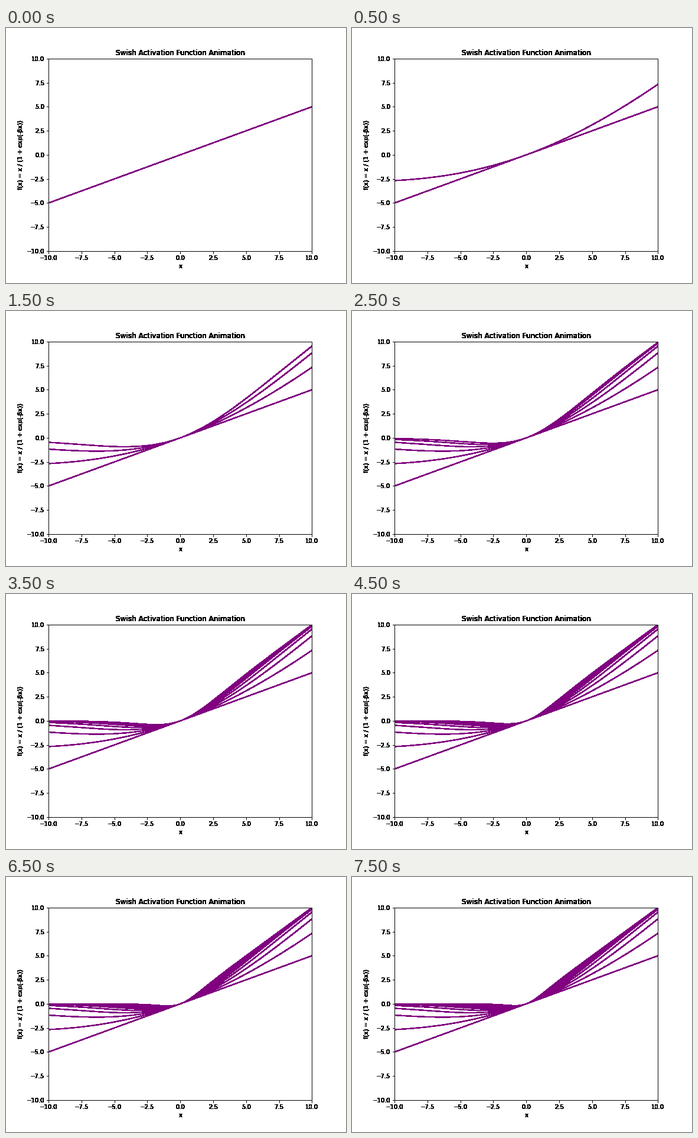
Recreate the animation shown at these times as a matplotlib script. Size 576 by 432 pixels, loop 8 s.

```python
import matplotlib.pyplot as plt
import numpy as np
from matplotlib.animation import FuncAnimation
from matplotlib.colors import to_rgb

STEPS, INTERVAL = 16, 500
betas = np.linspace(0, 10, 100)[:STEPS]
x = np.linspace(-10, 10, 400)

plt.rcParams.update({"font.family": "DejaVu Sans", "font.size": 10})


def harden(artist, color="black"):
    """Paint every pixel the artist touches in one opaque colour."""
    rgb = np.round(np.array(to_rgb(color)) * 255)

    def solid(img, dpi):
        out = np.empty(img.shape, np.uint8)
        out[..., :3] = rgb
        out[..., 3] = np.where(img[..., 3] > 0, 255, 0)
        return out, 0, 0

    artist.set_agg_filter(solid)


def swish(x, beta):
    return x / (1 + np.exp(-beta * x))


fig = plt.figure(figsize=(8, 6), dpi=72, facecolor="white")
fig.subplots_adjust(left=0.125, right=0.9, bottom=0.125, top=0.88)
ax = fig.add_subplot()
ax.set(xlim=(-10, 10), ylim=(-10, 10), xlabel="x",
       ylabel="f(x) = x / (1 + exp(-βx))",
       title="Swish Activation Function Animation")

for part in (ax.xaxis, ax.yaxis, ax.title, *ax.spines.values()):
    harden(part)

lines = [ax.plot(x, swish(x, b), color="purple", lw=1.5)[0] for b in betas]
for line in lines:
    harden(line, "purple")


def update(step):
    for i, line in enumerate(lines):
        line.set_visible(i <= step)
    return lines


anim = FuncAnimation(fig, update, frames=STEPS, interval=INTERVAL,
                     repeat=True, repeat_delay=0)
plt.show()
```
